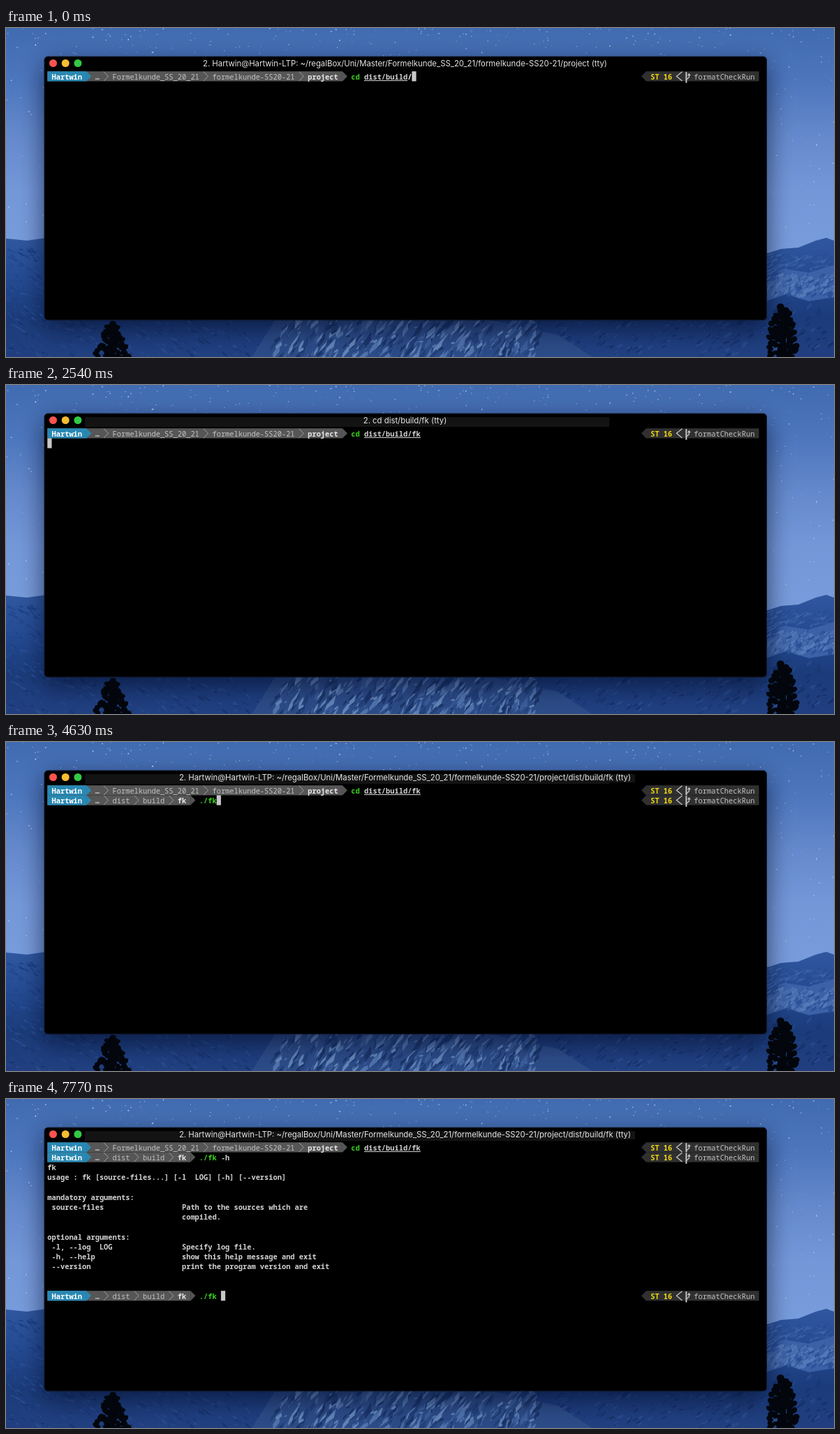
Write an HTML page with a canvas that moves like this. It is 1186x472 px and loops after 8 s.

```html
<!DOCTYPE html>
<html lang="de">
<head>
<meta charset="utf-8">
<title>Terminal</title>
<style>
html, body { margin: 0; width: 100%; height: 100%; overflow: hidden; background: #000; }
canvas { display: block; }
</style>
</head>
<body>
<canvas id="stage" width="1186" height="472"></canvas>
<script>
const W = 1186, H = 472, LOOP = 8000;
const CELL = 6.215, ROW = 14.2, LEFT = 59.3, TOP = 62.2;
const TEXT = '#d2d2d2', CURSOR = '#c7c7c7', GREEN = '#3bd41f', RED = '#ff6e67';
const BLUE = '#2988b3', GREY = '#565656', DARK = '#303030', BLACK = '#03060c';
const USER = 'Hartwin', COURSE = 'Formelkunde_SS_20_21', REPO = 'formelkunde-SS20-21';
const HOST_TITLE = `2. ${USER}@${USER}-LTP: ~/regalBox/Uni/Master/${COURSE}/${REPO}/project`;
const RUN = './fk -h';

const HELP = [
  [2, 0, 'fk'],
  [3, 0, 'usage : fk [source-files...] [-l  LOG] [-h] [--version]'],
  [5, 0, 'mandatory arguments:'],
  [6, 1, 'source-files'], [6, 31, 'Path to the sources which are'],
  [7, 31, 'compiled.'],
  [9, 0, 'optional arguments:'],
  [10, 1, '-l, --log  LOG'], [10, 31, 'Specify log file.'],
  [11, 1, '-h, --help'], [11, 31, 'show this help message and exit'],
  [12, 1, '--version'], [12, 31, 'print the program version and exit']
];

// time, number of typed characters
const FIRST_RUN = [[2990, 0], [3280, 1], [4180, 2], [4480, 3], [4630, 4], [4920, 5], [5070, 6], [5220, 7]];
const SECOND_RUN = [[5970, 0], [7170, 1], [7320, 2], [7620, 4], [7770, 5]];

const stage = document.getElementById('stage').getContext('2d');
const backdrop = document.createElement('canvas');
backdrop.width = W;
backdrop.height = H;
let g = backdrop.getContext('2d');

let seed = 11;
const rnd = (a = 0, b = 1) => {
  seed = (seed * 16807) % 2147483647;
  return a + (b - a) * seed / 2147483647;
};
const X = col => LEFT + col * CELL;
const Y = row => TOP + row * ROW;

function rect(x, y, w, h, color) {
  g.fillStyle = color;
  g.fillRect(x, y, w, h);
}

function shape(points, color) {
  g.fillStyle = color;
  g.beginPath();
  for (let i = 0; i < points.length; i += 2) g.lineTo(points[i], points[i + 1]);
  g.fill();
}

function line(points, color, width = 1) {
  g.strokeStyle = color;
  g.lineWidth = width;
  g.beginPath();
  for (let i = 0; i < points.length; i += 2) g.lineTo(points[i], points[i + 1]);
  g.stroke();
}

function fade(y0, y1, ...colors) {
  const grad = g.createLinearGradient(0, y0, 0, y1);
  colors.forEach((c, i) => grad.addColorStop(i / (colors.length - 1), c));
  return grad;
}

// bent, tapering flecks that roughen a slope
function texture(n, x0, y0, x1, y1, slant, reach, colors) {
  for (let i = 0; i < n; i++) {
    const x = rnd(x0, x1), y = rnd(y0, y1), len = rnd(2, reach), w = rnd(1, 4);
    const dx = slant * len * rnd(0.5, 1.3);
    shape([x, y, x + dx * 0.4 + w, y + len * 0.5, x + dx, y + len, x + dx * 0.6 - w, y + len * 0.6], colors[i % colors.length]);
  }
}

// clumps of needles that widen downwards
function tree(x, top, width) {
  rect(x - 4, top, 8, H - top, BLACK);
  g.fillStyle = BLACK;
  for (let y = top; y < H + 8; y += 4) {
    const reach = Math.min(width, 5 + (y - top) * 0.55);
    for (let i = -2; i <= 2; i++) {
      g.beginPath();
      g.ellipse(x + i * reach * 0.4 + rnd(-4, 4), y + Math.abs(i) * 2 + rnd(-2, 3), rnd(3, 6), rnd(2.5, 5), -i * 0.3, 0, 7);
      g.fill();
    }
  }
}

function paintBackdrop() {
  rect(0, 0, W, H, fade(0, 310, '#416bb0', '#4d76bd', '#6589cc', '#7497d8', '#789bdb'));
  for (let i = 0; i < 620; i++) {
    const s = rnd(0.7, 1.6);
    rect(rnd(0, W), 300 * rnd() ** 1.6, s, s, `rgba(225,238,255,${rnd(0.25, 0.9)})`);
  }

  shape([0, 302, 30, 305, 58, 301, 300, 340, 1085, 325, 1110, 317, 1135, 315, 1160, 305, 1175, 301, 1186, 305, 1186, 472, 0, 472],
    fade(300, H, '#30579f', '#244a92', '#1b3b7a', '#213f80'));
  texture(130, 0, 315, 58, 410, 1.5, 8, ['#2a5098', '#1c3f82', '#23488c']);
  texture(260, 0, 395, 370, 468, 1.3, 10, ['#28498c', '#17336a', '#234588', '#1a3872']);
  texture(130, 1088, 322, 1186, 350, -1.5, 8, ['#3c62a8', '#274c94', '#31579d']);

  shape([1088, 366, 1118, 346, 1150, 351, 1186, 340, 1186, 386, 1150, 392, 1118, 382, 1088, 392], '#3c61a6');
  texture(150, 1092, 350, 1190, 380, -0.8, 11, ['#5578b8', '#2d5098', '#4a6dae']);
  texture(300, 780, 392, 1186, 468, -1, 11, ['#28498c', '#17316a', '#223f80', '#1a3874']);

  shape([352, 472, 386, 418, 560, 416, 700, 420, 790, 440, 840, 472], '#2c4b87');
  texture(420, 390, 408, 770, 466, -0.7, 26, ['#4f72ac', '#1b3468', '#3a5c99', '#223f78', '#6284b8', '#2b4a86']);

  g.shadowColor = 'rgba(0,8,35,.65)';
  g.shadowBlur = 36;
  g.shadowOffsetY = 11;
  g.fillStyle = '#000';
  g.beginPath();
  g.roundRect(55, 41, 1034.5, 378, 5);
  g.fill();
  g.shadowColor = 'transparent';
  g.strokeStyle = '#10182a';
  g.lineWidth = 1;
  g.stroke();

  tree(152, 424, 26);
  tree(1113, 402, 19);
  // the window stays in front of the trees
  rect(56, 60, 1033, 354, '#000');

  ['#fc534f', '#f5bd32', '#32ca45'].forEach((c, i) => {
    g.fillStyle = c;
    g.beginPath();
    g.arc(67.5 + i * 17.7, 50.5, 5.5, 0, 7);
    g.fill();
  });
}

function write(row, col, text, color = TEXT, weight = 600, underlined = false) {
  g.font = `${weight} 10.36px "Noto Sans Mono", "DejaVu Sans Mono", monospace`;
  g.textAlign = 'left';
  g.fillStyle = color;
  g.fillText(text, X(col), Y(row) + 11.5);
  if (underlined) rect(X(col), Math.round(Y(row) + 12.5), text.length * CELL, 1, color);
}

function cursor(row, col) {
  rect(X(col), Y(row), CELL, ROW, CURSOR);
}

function arrow(row, col, color, dir = 1) {
  const x = X(dir > 0 ? col : col + 1), y = Y(row);
  shape([x, y, x + dir * 7, y + ROW / 2, x, y + ROW], color);
}

function chevron(row, col) {
  const x = X(col), y = Y(row);
  line([x, y + 0.5, x + 6.5, y + ROW / 2, x, y + ROW - 0.5], '#a0a0a0');
}

// returns the column where the command begins
function prompt(row, path) {
  const y = Y(row);
  const width = path.reduce((n, s) => n + s.length + 3, 13);
  rect(LEFT, y, X(width) - LEFT, ROW, GREY);
  arrow(row, width, GREY);
  rect(LEFT, y, 9 * CELL, ROW, BLUE);
  arrow(row, 9, BLUE);
  write(row, 1, USER, '#fff', 900);
  write(row, 11, '…', '#c6c6c6');
  let col = 13;
  path.forEach((name, i) => {
    const last = i === path.length - 1;
    chevron(row, col);
    write(row, col + 2, name, last ? '#e8e8e8' : '#c2c2c2', last ? 700 : 500);
    col += name.length + 3;
  });

  rect(X(138), y, 26 * CELL, ROW, DARK);
  arrow(row, 137, DARK, -1);
  write(row, 139, 'ST 16', '#f0d60f', 600);
  const x = X(147), mid = y + ROW / 2;
  line([968.5, y + 0.5, 960.5, mid, 968.5, y + ROW - 0.5], '#c4c4c4', 1.3);
  line([x + 1.5, y + 1, x + 1.5, y + 16.5], '#c4c4c4', 2);
  line([x + 1.5, y + 12, x + 5.5, y + 8.5, x + 5.5, y + 4], '#c4c4c4', 1.3);
  shape([x + 3, y + 6, x + 5.5, y + 2.5, x + 8, y + 6], '#c4c4c4');
  write(row, 149, 'formatCheckRun', '#c2c2c2', 500);
  return width + 2;
}

function typeRun(row, col, n) {
  const known = n === 1 || n > 3;
  write(row, col, RUN.slice(0, Math.min(n, 4)), known ? GREEN : TEXT, 600, !known && n > 0);
  if (n > 5) write(row, col + 5, RUN.slice(5, n));
}

function typed(steps, t) {
  return steps.filter(s => s[0] <= t).pop()[1];
}

function titleBar(t) {
  let title = HOST_TITLE + (t < 2540 ? '' : '/dist/build/fk');
  if (t >= 2540 && t < 2690) title = '2. cd dist/build/fk';
  if (t >= 5520 && t < 5670) title = '2. ' + RUN;
  if (t >= 2540) rect(113, 46, 751, 14, '#131313');
  if (t >= 2690) rect(864, 46, 37, 12, '#131313');
  g.font = '400 11.35px Inter, Roboto, sans-serif';
  g.textAlign = 'center';
  g.fillStyle = '#e4e4e4';
  g.fillText(title + ' (tty)', 571.5, 55);
}

function changeDirectory(t) {
  const col = prompt(0, [COURSE, REPO, 'project']);
  const arg = col + 3;
  const menu = t >= 1790 && t < 2240;
  let path = 'dist/build/fk';
  if (t < 440) path = 'dist/build';
  else if (t >= 2240 && t < 2540) path += '/';
  write(0, col, 'cd', GREEN);
  write(0, arg, path, TEXT, 600, !menu);
  let end = arg + path.length;
  if (t < 440 || menu) write(0, end++, '/', '#fff', 800);
  if (t < 2540) cursor(0, end);

  if (t >= 740 && t < 2240) {
    if (menu) {
      rect(LEFT, Y(1), 12 * CELL, ROW, CURSOR);
      write(1, 0, 'fk/', '#111');
    } else {
      write(1, 0, 'fk', RED, 700);
      write(1, 2, '/');
    }
    write(1, 14, 'fk-examples', RED, 700);
    write(1, 25, '/');
  }
}

function runLine(row, steps, t) {
  const col = prompt(row, ['dist', 'build', 'fk']);
  const n = typed(steps, t);
  typeRun(row, col, n);
  return col + n;
}

function draw(t) {
  g.drawImage(backdrop, 0, 0);
  titleBar(t);
  changeDirectory(t);
  if (t >= 2540 && t < 2990) cursor(1, 0);
  if (t >= 2990) {
    const end = runLine(1, FIRST_RUN, t);
    if (t < 5520) cursor(1, end);
    else if (t < 5670) cursor(2, 0);
  }
  if (t >= 5670) HELP.forEach(([row, col, text]) => write(row, col, text));
  if (t >= 5670 && t < 5970) cursor(15, 0);
  if (t >= 5970) cursor(15, runLine(15, SECOND_RUN, t));
}

paintBackdrop();
g = stage;
const start = performance.now();
function tick() {
  draw((performance.now() - start) % LOOP);
  requestAnimationFrame(tick);
}
tick();
</script>
</body>
</html>
```
